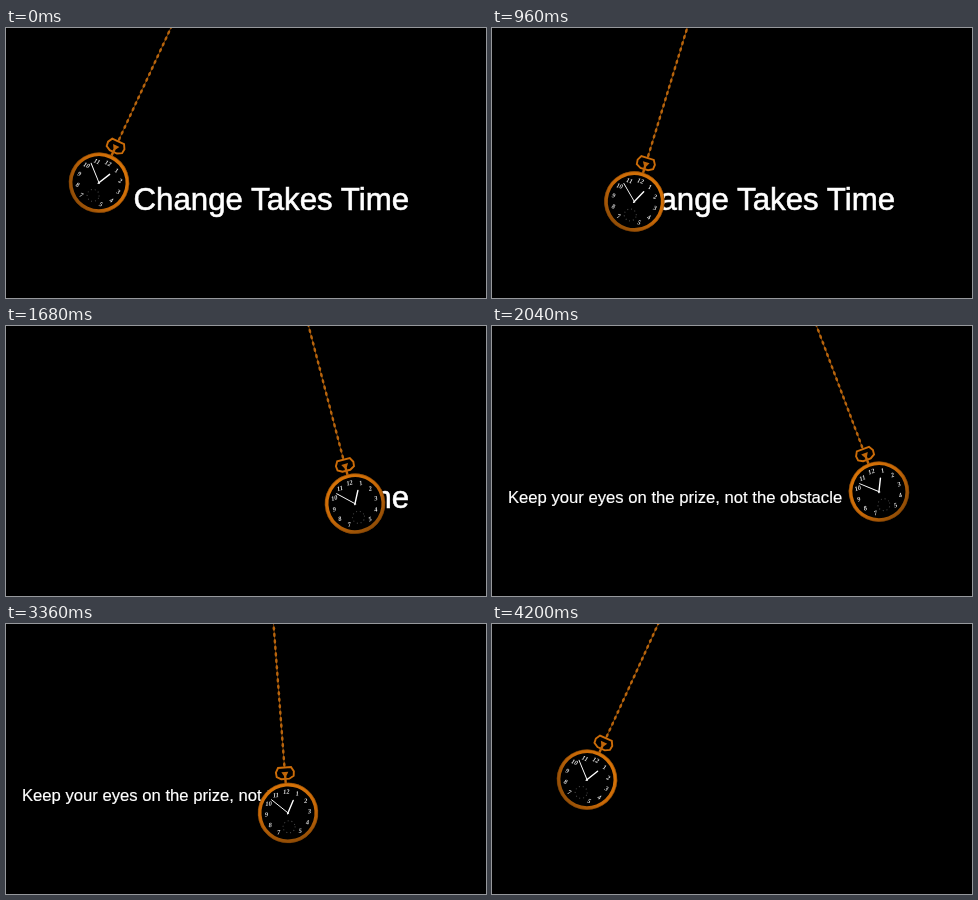
An HTML page for the animation above (4320 ms loop, 480 px wide and 270 px high).

```html
<!DOCTYPE html>
<html lang="en">
<head>
<meta charset="utf-8">
<title>Change Takes Time</title>
<style>
  html, body { margin: 0; width: 100%; height: 100%; overflow: hidden; background: #000; }
  svg { display: block; width: 100vw; height: 100vh; }
  text { fill: #fff; stroke: #fff; font-family: "Liberation Sans", Arial, sans-serif; }
  #dial text {
    font: italic bold 6.5px "Liberation Serif", "Times New Roman", serif;
    text-anchor: middle; fill: #e4e4e4; stroke: none;
  }
</style>
</head>
<body>
<svg viewBox="0 0 480 270">
  <defs>
    <linearGradient id="gold" gradientUnits="userSpaceOnUse" x1="0" y1="-31" x2="0" y2="31">
      <stop offset="0" stop-color="#d87408"/>
      <stop offset=".5" stop-color="#c56707"/>
      <stop offset="1" stop-color="#8f4c06"/>
    </linearGradient>
    <clipPath id="ahead"><rect id="aheadBox" width="480" height="270"/></clipPath>
    <clipPath id="behind"><rect id="behindBox" width="480" height="270"/></clipPath>
  </defs>
  <rect width="480" height="270"/>

  <g id="first" clip-path="url(#ahead)">
    <text x="127.5" y="182.3" font-size="31.25" stroke-width=".6">Change Takes Time</text>
  </g>
  <g id="second" clip-path="url(#behind)">
    <text x="15.9" y="177.3" font-size="16.67" stroke-width=".2">Keep your eyes on the prize, not the obstacle</text>
  </g>

  <g id="watch">
    <g id="chain"></g>
    <path d="M-4-34L-8.5-36.5L-9-41L-6.5-45.5H6.5L9-41L8.5-36.5L4-34Z" fill="none" stroke="#cc6c08" stroke-width="1.9"/>
    <path d="M-3.5-41H3.5L1.2-37V-29H-1.2V-37Z" fill="#c06508"/>
    <circle r="28.3" stroke="url(#gold)" stroke-width="3.6"/>
    <circle r="29.9" fill="none" stroke="#7a3f04" stroke-width=".5"/>
    <g id="dial"></g>
    <circle cy="14" r="6" fill="none" stroke="#4a4a4a" stroke-dasharray="1 2.8"/>
    <g stroke="#fff" stroke-linecap="round">
      <path d="M0 1V-21" stroke-width=".9" transform="rotate(-47)"/>
      <path d="M0 1V-13.5" stroke-width="1.4" transform="rotate(27)"/>
    </g>
  </g>
</svg>
<script>
const LOOP = 4320, STEP = 120;
const PIVOT = { x: 253, y: -190 }, ROD = 380;
const MID = -2.13, SWING = 22.77;
// [step, phase in degrees] of the swing
const PHASE = [[0, 0], [1, 19.6], [5, 79.3], [9, 137.4], [12, 180],
  [13, 198], [17, 253.4], [22, 321.4], [24, 350.2], [25, 360]];

const $ = id => document.getElementById(id);
const rad = deg => deg * Math.PI / 180;

function add(parent, tag, attrs, label) {
  const el = document.createElementNS("http://www.w3.org/2000/svg", tag);
  for (const key in attrs) el.setAttribute(key, attrs[key]);
  if (label) el.textContent = label;
  parent.append(el);
}

function buildWatch() {
  add($("chain"), "path", { d: "M0-45V-235", stroke: "#6e3a06", "stroke-width": .9 });
  for (let y = -48.5; y > -235; y -= 6.5) {
    add($("chain"), "ellipse", { cy: y, rx: 1.3, ry: 2.3, fill: "#b8640c" });
  }
  for (let hour = 1; hour <= 12; hour++) {
    if (hour === 6) continue;
    const a = rad(hour * 30);
    add($("dial"), "text", { x: 21.5 * Math.sin(a), y: 2.2 - 21.5 * Math.cos(a) }, String(hour));
  }
}

// The swing rests at both ends and moves in even steps between.
function stepAt(t) {
  if (t < 720) return 0;
  if (t < 2880) return Math.min(12, 1 + Math.floor((t - 720) / STEP));
  return 13 + Math.floor((t - 2880) / STEP);
}

function phaseAt(step) {
  const k = PHASE.findIndex(p => p[0] > step);
  const [s0, p0] = PHASE[k - 1], [s1, p1] = PHASE[k];
  return p0 + (p1 - p0) * (step - s0) / (s1 - s0);
}

function draw(t) {
  const step = stepAt(t);
  const angle = MID - SWING * Math.cos(rad(phaseAt(step)));
  const x = PIVOT.x + ROD * Math.sin(rad(angle));
  const y = PIVOT.y + ROD * Math.cos(rad(angle));
  $("watch").setAttribute("transform", `translate(${x} ${y}) rotate(${-angle})`);
  // The shade leans further outward than the watch itself.
  $("gold").setAttribute("gradientTransform", `rotate(${-1.5 * angle})`);
  $("aheadBox").setAttribute("x", x);
  $("behindBox").setAttribute("width", x);
  $("first").style.display = step < 11 ? "" : "none";
  $("second").style.display = step >= 12 && step < 24 ? "" : "none";
}

buildWatch();
const start = performance.now();
function tick() {
  draw((performance.now() - start) % LOOP);
  requestAnimationFrame(tick);
}
tick();
</script>
</body>
</html>
```
